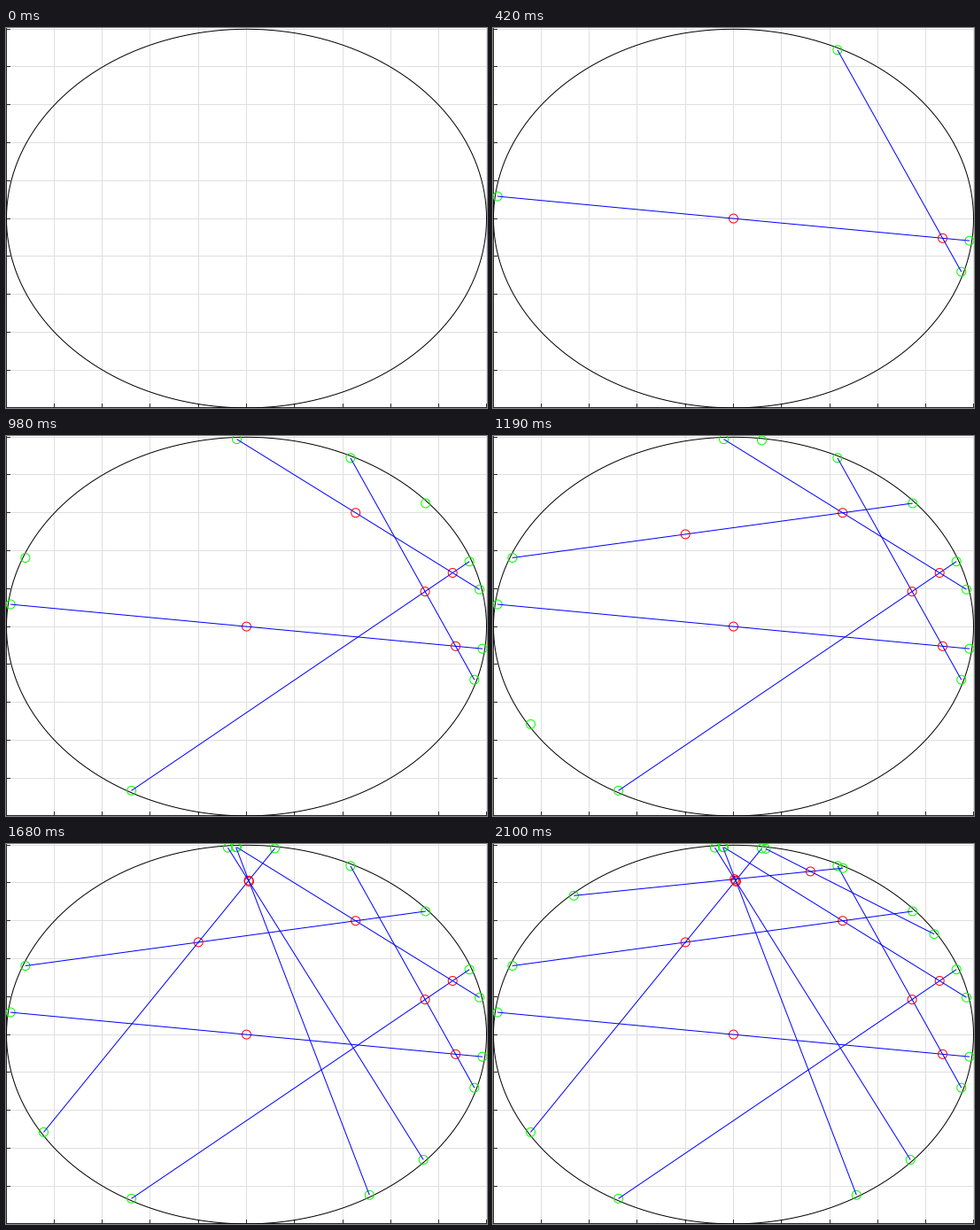
A matplotlib script that plays this animation: 543 px wide and 429 px high, repeating every 2170 ms.

```python
import numpy as np
import matplotlib.pyplot as plt
from matplotlib.animation import FuncAnimation

W, H, DPI = 543, 429, 64
PX = 72 / DPI          # one pixel in points
DARK, GRID = "#262626", "#dfdfdf"
STEP_MS, DIVS, TICK = 70, 10, 5
CENTER = np.array([271, 214.6])
RADII = np.array([271, 213.8])

# Angles of both chord ends, in degrees
ENDS = [(173.2, -6.8), (64.05, -16.5), (20.3, 241.05), (92.35, 11.4),
        (158.5, 41.1), (83.15, 211.4), (92.55, -58.85), (94.5, -41.9),
        (132.2, 62.6), (82.2, 32.4)]

fig = plt.figure(figsize=(W / DPI, H / DPI), dpi=DPI, facecolor="white")
ax = fig.add_axes([0, 0, 1, 1])
ax.axis("off")
ax.set_xlim(-0.5, W - 0.5)
ax.set_ylim(H - 0.5, -0.5)
ax.set_autoscale_on(False)


def stroke(x, y, color):
    return ax.plot(x, y, color=color, lw=PX, snap=False,
                   solid_capstyle="butt", zorder=2)[0]


def on_oval(center, radii, degrees):
    t = np.radians(degrees)
    return center + radii * np.array([np.cos(t), -np.sin(t)]).T


def oval(center, radii, color):
    return stroke(*on_oval(center, radii, np.arange(361)).T, color)


def ring(point, color):
    return oval(point, 5, color)


def crossing(p, q):
    """Point where two chords meet."""
    (a, b), (c, d) = p, q
    t = np.linalg.solve(np.column_stack([b - a, c - d]), c - a)[0]
    return a + t * (b - a)


def vertical(xs, y0, y1, color):
    for x in xs:
        stroke([x, x], [y0, y1], color)


def horizontal(ys, x0, x1, color):
    for y in ys:
        stroke([x0, x1], [y, y], color)


right, bottom = W - 0.5, H - 0.5
xs = np.round(np.linspace(-0.27, W - 0.73, DIVS + 1))
ys = np.round(np.linspace(0.6, H - 0.51, DIVS + 1))
vertical(xs, -0.5, bottom, GRID)
horizontal(ys, -0.5, right, GRID)
vertical(xs, bottom - TICK, bottom, DARK)
horizontal(ys, -0.5, TICK - 0.5, DARK)
vertical([0], -0.5, bottom, DARK)
horizontal([H - 1], -0.5, right, DARK)
oval(CENTER, RADII, "black")

# Each chord starts from a point on the one before, then gets ends and a line
stages = []
chords = [on_oval(CENTER, 0.99 * RADII, np.array(pair)) for pair in ENDS]
for i, chord in enumerate(chords):
    start = crossing(chords[i - 1], chord) if i else CENTER
    stages.append([ring(start, "red")])
    stages.append([ring(end, "lime") for end in chord])
    stages.append([stroke(*chord.T, "blue")])


def update(n):
    for i, stage in enumerate(stages):
        for part in stage:
            part.set_visible(i < n)
    return [part for stage in stages for part in stage]


anim = FuncAnimation(fig, update, frames=len(stages) + 1, interval=STEP_MS,
                     repeat=True, repeat_delay=0, blit=False)
plt.show()
```
